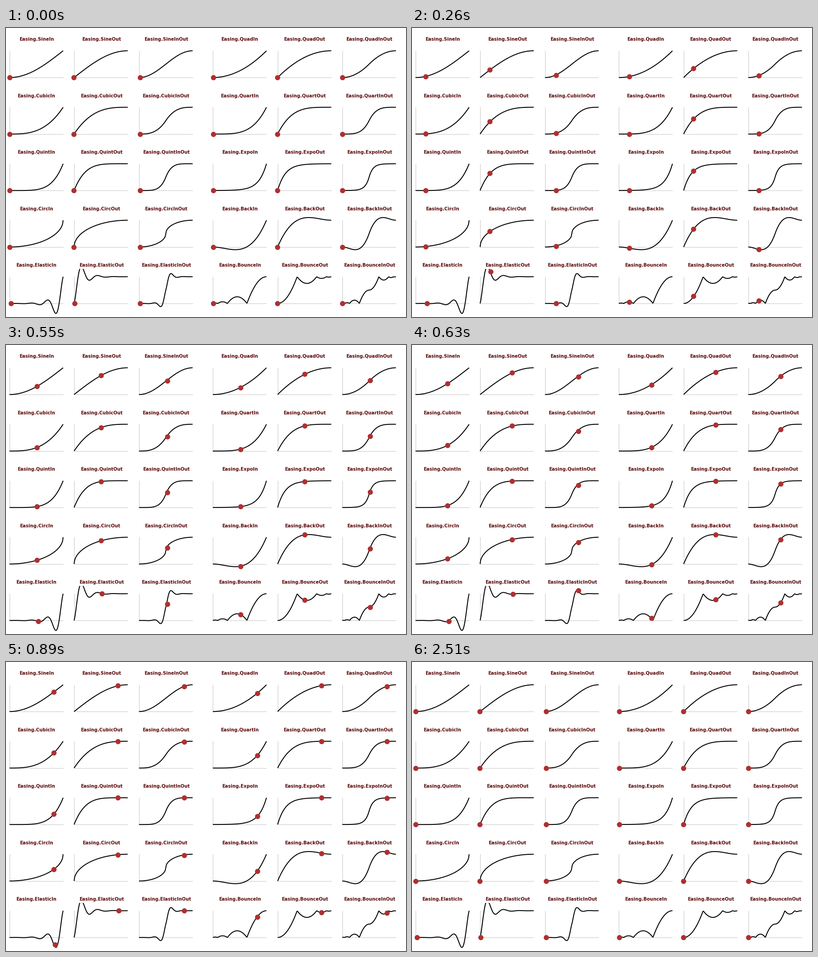
Animation, 880 px wide and 637 px high, one loop 2.89 s. Source, as a matplotlib script:

```python
import numpy as np
import matplotlib.pyplot as plt
from matplotlib.animation import FuncAnimation
from matplotlib.collections import LineCollection
from matplotlib.patches import Rectangle

W, H, DPI = 880, 637, 100
PX = 72 / DPI
LOOP, TICK = 2890, 10
CURVE_W, CURVE_H = 118, 59
TOP, PITCH = 109.2, 124.5
TRAVEL = 117.5
BLACK, RED, MAROON, GRAY = "#000000", "#ae3032", "#5c0a0c", "#d2d2d2"

# Moments at which the dots jump to a new place
STEPS = np.array([0, 130, 200, 260, 340, 410, 490, 550, 630, 680,
                  760, 830, 900, 970, 1040, 2510])


def power(n):
    return lambda t: t ** n


def sine(t):
    return 1 - np.cos(t * np.pi / 2)


def expo(t):
    return 2 ** (10 * (t - 1))


def circ(t):
    return 1 - np.sqrt(1 - t * t)


def back(s):
    return lambda t: t * t * ((s + 1) * t - s)


def elastic(p):
    return lambda t: -expo(t) * np.sin((t - 1 - p / 4) * 2 * np.pi / p)


def bounce(t):
    arcs = [(0, 1), (6 / 11, 1 / 4), (9 / 11, 1 / 16), (10.5 / 11, 1 / 64)]
    return np.max([h - 7.5625 * (1 - t - c) ** 2 for c, h in arcs], axis=0)


def variants(f, f_both=None):
    g = f_both or f

    def ease_out(t):
        return 1 - f(1 - t)

    def ease_both(t):
        first = g(np.minimum(2 * t, 1)) / 2
        last = 1 - g(np.minimum(2 - 2 * t, 1)) / 2
        return np.where(t < 0.5, first, last)

    return [("In", f), ("Out", ease_out), ("InOut", ease_both)]


ROWS = [
    [("Sine", variants(sine)), ("Quad", variants(power(2)))],
    [("Cubic", variants(power(3))), ("Quart", variants(power(4)))],
    [("Quint", variants(power(5))), ("Expo", variants(expo))],
    [("Circ", variants(circ)),
     ("Back", variants(back(1.70158), back(1.70158 * 1.525)))],
    [("Elastic", variants(elastic(0.3), elastic(0.45))),
     ("Bounce", variants(bounce))],
]
AXIS_X = [7.7, 149.8, 292.6, 455, 597.6, 739.8]
DOT_X = [7.7, 149.1, 294.8, 456.1, 597.1, 740.4]
TITLE_X = [67, 210, 352.3, 514.2, 657, 799.4]
NUDGE = {"ElasticIn": 3, "ElasticOut": 1.7}

fig = plt.figure(figsize=(W / DPI, H / DPI), dpi=DPI, facecolor="white")
ax = fig.add_axes([0, 0, 1, 1])
ax.set_xlim(0, W)
ax.set_ylim(H, 0)
ax.axis("off")

samples = np.linspace(0, 1, 101)
frames_xy = []
dots = []
for r, row in enumerate(ROWS):
    base = TOP + PITCH * r
    cells = [(family + kind, f) for family, kinds in row for kind, f in kinds]
    for c, (name, f) in enumerate(cells):
        x = AXIS_X[c]
        frames_xy.append([(x, base - CURVE_H - 0.5), (x, base),
                          (x + CURVE_W, base)])
        line, = ax.plot(x + CURVE_W * samples, base - CURVE_H * f(samples),
                        color=BLACK, lw=2 * PX, zorder=2,
                        solid_capstyle="butt")
        line.set_clip_path(Rectangle((0, base - 76), W, 110,
                                     transform=ax.transData))
        ax.text(TITLE_X[c], base - 80.9, "Easing." + name,
                family="DejaVu Sans", weight="bold", size=9.95 * PX,
                color=MAROON, ha="center", va="baseline", zorder=3)
        dots.append((DOT_X[c] + NUDGE.get(name, 0), base, f))

ax.add_collection(LineCollection(frames_xy, colors=GRAY, linewidths=1.4 * PX,
                                 zorder=1), autolim=False)
balls = ax.scatter([0] * len(dots), [0] * len(dots), s=(11.4 * PX) ** 2,
                   color=RED, linewidths=0, zorder=4)


def progress(ms):
    now = STEPS[STEPS <= ms][-1]
    if now >= STEPS[-1]:
        return 0.0
    return float(np.clip((now - 92) / 893, 0, 1))


def update(i):
    t = progress(i * TICK)
    balls.set_offsets([(x + TRAVEL * t, y - CURVE_H * float(f(t)))
                       for x, y, f in dots])
    return balls,


anim = FuncAnimation(fig, update, frames=LOOP // TICK, interval=TICK,
                     repeat=True, repeat_delay=0, blit=False)
plt.show()
```
